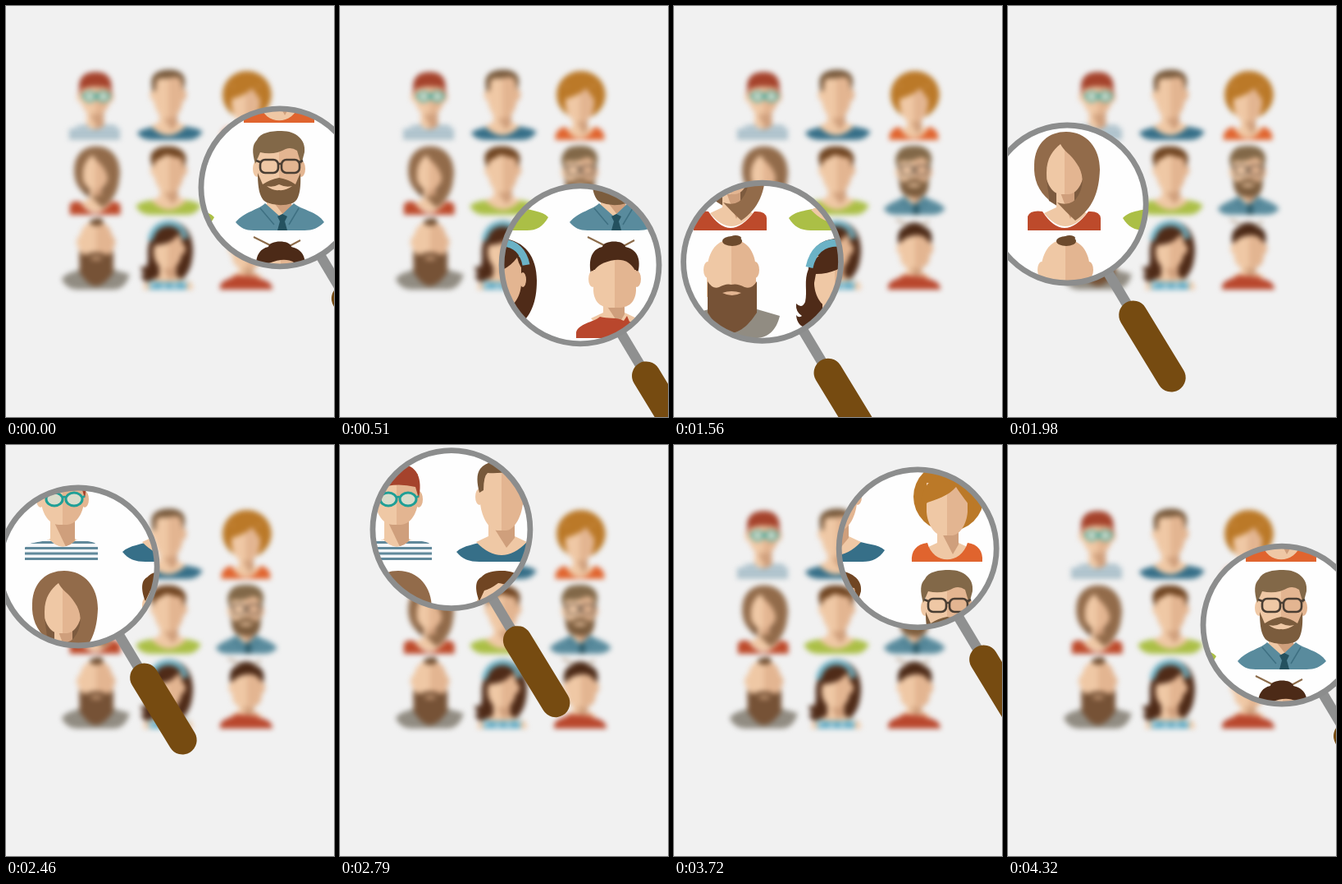
These frames come from a looping animation (400x500 px, 4.35 s). An HTML page with a canvas:

```html
<!DOCTYPE html>
<html lang="en">
<head>
<meta charset="utf-8">
<title>Magnifier over faces</title>
<style>
html, body { margin: 0; width: 100%; height: 100%; overflow: hidden; background: #f1f1f1; }
canvas { display: block; }
</style>
</head>
<body>
<canvas id="stage" width="400" height="500"></canvas>
<script>
const W = 400, H = 500, LOOP = 4350, STEP = 30;
const LIGHT = '#efc8a5', DARK = '#e3b591', SHADE = '#cf9f7c';

function layer() {
  const c = document.createElement('canvas');
  c.width = W;
  c.height = H;
  return c;
}

const people = layer(), crowd = layer();
const g = people.getContext('2d');

function fill(color, d) {
  g.fillStyle = color;
  g.fill(new Path2D(d));
}

function line(color, width, d) {
  g.strokeStyle = color;
  g.lineWidth = width;
  g.stroke(new Path2D(d));
}

function oval(color, x, y, rx, ry) {
  g.fillStyle = color;
  g.beginPath();
  g.ellipse(x, y, rx, ry, 0, 0, Math.PI * 2);
  g.fill();
}

// Face in two tones, split down the middle
function face(x, top, chin, w) {
  const mid = top + (chin - top) * 0.55;
  for (const s of [1, -1]) {
    const e = x + s * w;
    fill(s < 0 ? LIGHT : DARK,
      `M${x} ${top}H${e}V${mid}C${e - s} ${mid + 15} ${x + s * w * 0.62} ${chin} ${x + s * 5} ${chin}H${x}Z`);
  }
}

function ears(x, y, w) {
  oval(LIGHT, x - w, y, 5, 10);
  oval(DARK, x + w, y, 5, 10);
}

function neck(x, top, base, w) {
  fill(LIGHT, `M${x - w} ${top}V${base - 5}L${x - w - 15} ${base + 2}Q${x} ${base + 34} ${x + w + 15} ${base + 2}L${x + w} ${base - 5}V${top}Z`);
  fill(SHADE, `M${x - w} ${top}H${x + w}V${base - 3}L${x + 6} ${base + 9}Z`);
}

function stripedBoy() {
  neck(69, 84, 119, 15);
  ears(69, 66, 27);
  face(69, 35, 97, 26);
  fill('#a5432c', 'M42 64C37 40 43 23 69 23C95 22 101 41 96 65L92 51Q68 45 46 53Z');
  g.lineWidth = 3;
  g.strokeStyle = '#1f9f96';
  for (const x of [59, 83]) {
    g.fillStyle = '#d9dccb';
    g.beginPath();
    g.ellipse(x, 66, 10, 8, 0, 0, 7);
    g.fill();
    g.stroke();
  }
  line('#1f9f96', 2.5, 'M69 64Q71 62 73 64M49 64L45 62M93 64L96 62');
  g.save();
  const shirt = new Path2D('M23 140V125C26 118 40 119 53 115Q69 132 86 115C99 118 110 116 112 124V140Z');
  g.clip(shirt);
  g.fillStyle = '#f6f8fa';
  g.fill(shirt);
  for (const y of [118.5, 125.5, 132, 138.5]) line('#61899b', 3.2, `M20 ${y}H115`);
  g.restore();
}

function blueMan() {
  fill('#366f88', 'M142 130C150 122 166 121 178 116H220C234 121 249 120 257 128C250 138 242 142 230 142H170C158 142 149 139 142 130Z');
  g.save();
  g.translate(0, -2);
  neck(197, 92, 118, 16);
  g.restore();
  ears(197, 63, 27);
  face(197, 29, 104, 26);
  fill('#77583a', 'M170 58C167 46 166 36 171 29C178 20 190 19 202 19C219 20 228 29 226 44L223 56L219 37Q215 31 207 32Q194 35 180 34Q175 38 175 55Z');
}

function curlyWoman() {
  oval('#bb7928', 335, 63, 43, 42);
  neck(334, 96, 124, 13);
  fill('#e0642e', 'M290 142C289 129 295 121 309 119C316 146 350 146 358 119C371 121 377 129 376 142Z');
  face(333, 46, 110, 25);
  fill('#bb7928', 'M300 80C300 45 320 35 338 38C357 41 369 60 365 82C358 69 350 61 344 51C335 62 318 67 309 70Z');
}

function longHairWoman() {
  fill('#7d5b3f', 'M42 190H104L94 240L82 257L50 237Z');
  neck(70, 214, 250, 11);
  fill('#bd4a2b', 'M24 273V256Q27 248 42 250Q68 290 98 250Q112 249 113 258V273Z');
  face(69, 164, 229, 24);
  fill('#926b4a', 'M50 236C37 225 31 211 32 193C33 166 50 153 71 153C96 153 112 173 112 199C111 226 104 246 82 261Q70 250 60 239Q78 245 86 230C93 218 92 203 84 192C77 180 68 177 64 168C55 175 47 185 47 203C47 218 50 226 50 236Z');
}

function greenMan() {
  fill('#abbf46', 'M140 258C149 248 166 249 180 244H218C232 249 247 249 254 257C247 269 240 273 228 273H167C154 273 146 268 140 258Z');
  neck(198, 222, 246, 16);
  ears(198, 195, 27);
  face(198, 163, 234, 26);
  fill('#704522', 'M170 190C165 178 164 165 172 161C178 154 188 153 198 153C215 153 230 163 228 178L224 191L220 174C206 172 198 168 193 168Q182 176 176 177Z');
}

function beardedMan() {
  neck(333, 228, 246, 15);
  fill('#598b9d', 'M280 263C291 250 308 248 316 240L334 256L351 240C360 248 380 250 388 263C381 270 374 273 364 273H302C292 273 286 270 280 263Z');
  line('#3e7082', 1.5, 'M310 246L327 266M357 246L345 266');
  fill('#24515f', 'M331 256L337 253L343 256L340 262L343 273H331L334 262Z');
  ears(333, 198, 27);
  face(333, 166, 240, 26);
  fill('#7b5c3d', 'M307 203L313 217Q322 211 333 209Q345 211 353 217L359 203C360 222 358 237 349 240Q333 245 318 239C309 235 307 220 307 203Z');
  fill(LIGHT, 'M318 219Q326 221 333 217Q341 221 349 219Q341 225 333 224Q325 225 318 219Z');
  fill('#826848', 'M304 192C300 178 300 169 306 163C310 154 323 152 336 152C354 152 366 163 364 178L360 193L355 176Q348 171 341 174Q327 182 310 178Z');
  g.strokeStyle = '#4a3e33';
  g.lineWidth = 2.6;
  for (const x of [310, 336]) {
    g.beginPath();
    g.roundRect(x, 187, 22, 16, 6);
    g.stroke();
  }
  line('#4a3e33', 2.6, 'M332 192H336M310 190L305 188M358 190L362 188');
}

function baldMan() {
  fill('#918c82', 'M10 385C18 374 34 372 45 368H98L129 377C125 394 115 404 99 404H40C25 404 14 397 10 385Z');
  ears(70, 321, 29);
  fill(LIGHT, 'M70 284C50 284 40 302 40 326V354H70Z');
  fill(DARK, 'M70 284C91 284 101 302 100 326V354H70Z');
  oval('#6c4a2d', 71, 286, 12, 6);
  oval('#6c4a2d', 75, 282, 7, 3);
  fill('#765236', 'M41 335Q47 345 55 342Q64 337 70 339Q77 337 86 342Q95 345 101 335V373C95 382 85 396 70 398C55 396 47 382 41 373Z');
  fill(DARK, 'M59 349Q70 345 82 349Q71 355 59 349Z');
}

function bandGirl() {
  fill('#4f2b18', 'M164 320C164 296 178 284 198 283C226 285 240 306 240 334C240 360 233 377 218 389H173C159 395 150 389 149 376Q152 380 156 377Q148 372 149 362Q156 369 160 360C163 347 158 334 164 320Z');
  fill(LIGHT, 'M154 404Q152 390 166 388L181 381V354H211V382L229 387Q240 390 240 404Z');
  fill(SHADE, 'M181 354H211V378L200 388Z');
  fill('#69aec5', 'M164 404L162 388L171 389Q197 392 220 389L231 387L229 404Z');
  for (const [x, y] of [[168, 395], [189, 398], [208, 397], [227, 392]]) oval('#fff', x, y, 2.7, 2.7);
  oval(DARK, 223, 333, 4, 9);
  face(196, 304, 367, 25);
  fill('#4f2b18', 'M165 328C166 307 181 298 198 297C216 298 226 308 226 324Q219 318 216 306C207 319 192 326 173 326L170 342Z');
  line('#6bb2c6', 9, 'M165 318C170 295 184 288 199 288C214 289 224 299 227 315');
}

function bunWoman() {
  line('#8c6b49', 2, 'M302 281L326 293M359 285L342 294');
  neck(334, 358, 378, 13);
  fill('#b9472d', 'M288 404V397C291 386 309 385 317 378C326 381 338 378 346 383L350 377L353 384C369 387 379 391 380 404Z');
  fill('#4c2a17', 'M306 326C302 304 310 295 320 293C321 285 346 284 348 293C362 296 368 307 363 326Z');
  ears(335, 332, 27);
  fill(LIGHT, 'M310 322Q316 312 335 309V330H310Z');
  fill(DARK, 'M335 309Q352 307 360 322V330H335Z');
  face(335, 321, 367, 26);
}

[stripedBoy, blueMan, curlyWoman, longHairWoman, greenMan,
  beardedMan, baldMan, bandGirl, bunWoman].forEach(draw => draw());

// Shrunken, blurred copy behind the glass
const b = crowd.getContext('2d');
const K = 0.695;
b.fillStyle = '#f1f1f1';
b.fillRect(0, 0, W, H);
b.filter = 'blur(3.3px)';
b.drawImage(people, 200 - 200 * K, 254 - 273 * K, W * K, H * K);

// Orbit: time, angle in degrees, radius
const orbit = [
  [0, 1.7, 131], [510, 47.4, 133], [1170, 104, 135], [1620, 140.2, 134],
  [1980, 169.6, 133], [2460, 211, 134], [2700, 231.5, 133], [3150, 272, 131],
  [3780, 320.6, 131], [4320, 360.9, 131], [4350, 361.7, 131]
];

function lensAt(t) {
  let i = 1;
  while (t > orbit[i][0]) i++;
  const [t0, a0, r0] = orbit[i - 1], [t1, a1, r1] = orbit[i];
  const k = (t - t0) / (t1 - t0);
  const a = (a0 + (a1 - a0) * k) * Math.PI / 180, r = r0 + (r1 - r0) * k;
  return [203 + r * Math.cos(a), 217 + r * Math.sin(a)];
}

const ctx = document.getElementById('stage').getContext('2d');

function bar(color, width, cap, x0, y0, x1, y1) {
  ctx.strokeStyle = color;
  ctx.lineWidth = width;
  ctx.lineCap = cap;
  ctx.beginPath();
  ctx.moveTo(x0, y0);
  ctx.lineTo(x1, y1);
  ctx.stroke();
}

function render(t) {
  const [x, y] = lensAt(t);
  ctx.drawImage(crowd, 0, 0);
  bar('#8f9090', 12.5, 'butt', x + 49, y + 82, x + 82, y + 137);
  bar('#764b11', 35, 'round', x + 80.5, y + 135, x + 127, y + 211);
  ctx.save();
  ctx.beginPath();
  ctx.arc(x, y, 96, 0, Math.PI * 2);
  ctx.clip();
  ctx.fillStyle = '#fefefe';
  ctx.fillRect(0, 0, W, H);
  ctx.drawImage(people, 0, 0);
  ctx.restore();
  ctx.strokeStyle = '#8c8d8d';
  ctx.lineWidth = 6.8;
  ctx.beginPath();
  ctx.arc(x, y, 96, 0, Math.PI * 2);
  ctx.stroke();
}

const start = performance.now();
function tick() {
  const t = (performance.now() - start) % LOOP;
  render(Math.floor(t / STEP) * STEP);
  requestAnimationFrame(tick);
}
tick();
</script>
</body>
</html>
```
